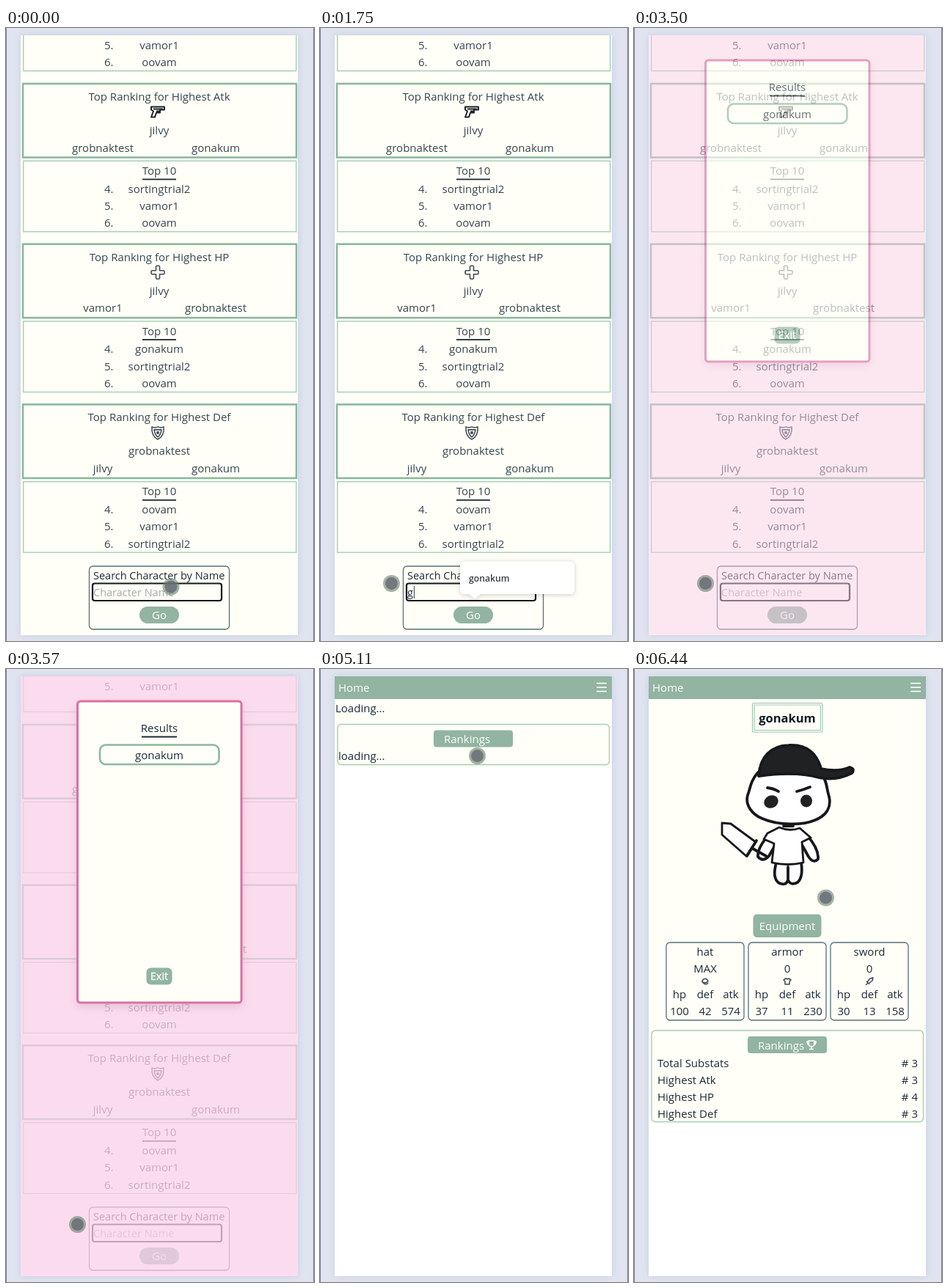
An HTML page that plays this animation: 420 by 836 pixels, repeating every 6510 ms.

```html
<!DOCTYPE html>
<html lang="en">
<head>
<meta charset="utf-8">
<title>Character rankings</title>
<style>
  html, body { margin: 0; width: 100%; height: 100%; overflow: hidden; background: #e1e4f0; }
  svg { display: block; width: 420px; height: 836px; font: 15px "Open Sans", sans-serif; fill: #36454f; }
  .mid { text-anchor: middle; }
  .end { text-anchor: end; }
  .white { fill: #fcfffa; }
  .dark { fill: #1c2a36; }
  .hint { fill: #a6aaab; }
  .form { font-size: 14.5px; }
  .fill { fill: #92b4a1; }
  .cream { fill: #fffff7; }
  .edge { fill: #7d8093; }
  .bold { stroke: #fff; stroke-width: .3; font-size: 14.5px; }
  .name { font-weight: bold; font-size: 16.5px; fill: #111820; }
  .option { font-weight: 600; font-size: 12.2px; fill: #35403f; }
  .thick, .thin, .plate, .slate, .focus, .icon, .ink { fill: none; }
  .thick { stroke: #8bb89f; stroke-width: 2.6; }
  .thin { stroke: #a6ccb6; stroke-width: 1.4; }
  .plate { stroke: #9cc7b0; stroke-width: 1.1; }
  .slate { stroke: #55717a; stroke-width: 1.3; }
  .focus { stroke: #12191c; stroke-width: 2.2; }
  .icon { stroke: #414c54; stroke-width: 1.6; stroke-linejoin: round; }
  .icon.heavy { stroke: #1d2428; stroke-width: 2; }
  .icon.light { stroke: #fcfffa; }
  .ink { stroke: #16181a; stroke-width: 3.8; stroke-linecap: round; stroke-linejoin: round; }
  .ink.fine { stroke-width: 2.8; }
  .ink.skin { fill: #fff; }
  .ink.solid { fill: #202123; }
  .popup { fill: #fff; filter: drop-shadow(0 1px 3px #0003); }
  .modal { fill: #fffff7; stroke: #d971a5; stroke-width: 3; filter: drop-shadow(0 5px 6px #a0608033); }
  .page { fill: #fff; filter: drop-shadow(0 0 5px #c3cee0); }
</style>
</head>
<body>
<svg id="stage" viewBox="0 0 420 836"></svg>
<script>
const LOOP = 6510, STEP = 70;
const HERO = 'gonakum', ACE = 'jilvy', BRUTE = 'grobnaktest', FIRST = 'vamor1', SECOND = 'oovam', BOARD = 'sortingtrial2';

const text = (x, y, s, cls = '') => `<text x="${x}" y="${y}" class="${cls}">${s}</text>`;
const box = (x, y, x2, y2, cls, r = 0) =>
  `<rect x="${x}" y="${y}" width="${x2 - x}" height="${y2 - y}" rx="${r}" class="${cls}"/>`;
const path = (d, cls, at = '0 0') => `<path d="${d}" class="${cls}" transform="translate(${at})"/>`;
const group = (id, body) => `<g id="${id}">${body}</g>`;

const rows = (y, names) => names.map((n, i) =>
  text(134, y + i * 23.3, `${i + 7 - names.length}.`) + text(209, y + i * 23.3, n, 'mid')).join('');

const icons = {
  Atk: ['M-9-7H9V-3H3V1H-2L-4 7H-9L-6-1-9-3ZM-6-4H7M-2-1H2', 'icon heavy'],
  HP: ['M-1.5-9H1.5L2.5-8V-2.5H8L9-1.5V1.5L8 2.5H2.5V8L1.5 9H-1.5L-2.5 8V2.5H-8L-9 1.5V-1.5L-8-2.5H-2.5V-8Z', 'icon'],
  Def: ['M-8-8Q-4-6 0-8Q4-6 8-8Q9 5 0 9Q-9 5-8-8ZM-5-4H5Q4 3 0 6Q-4 3-5-4ZM-1-1H1V1H-1Z', 'icon']
};

function ranking(y, stat, [one, two, three, ...rest]) {
  return box(23, y, 396, y + 100.5, 'thick') +
    text(209, y + 23, 'Top Ranking for Highest ' + stat, 'mid') +
    path(...icons[stat], `207 ${y + 38.5}`) +
    text(209, y + 69, one, 'mid') + text(132, y + 92.5, two, 'mid') + text(286, y + 92.5, three, 'mid') +
    box(23.7, y + 105.3, 395.7, y + 201.8, 'thin') +
    text(209, y + 124, 'Top 10', 'mid') + box(186, y + 129.5, 232, y + 131.3, 'dark') +
    rows(y + 148.5, rest);
}

const rankings = group('rankings',
  box(20, 10, 398, 828, 'cream') +
  path('M23.7 10V58.5H395.7V10', 'thin') + rows(29, [FIRST, SECOND]) +
  ranking(76, 'Atk', [ACE, BRUTE, HERO, BOARD, FIRST, SECOND]) +
  ranking(294.7, 'HP', [ACE, FIRST, BRUTE, HERO, BOARD, SECOND]) +
  ranking(513.4, 'Def', [BRUTE, ACE, HERO, SECOND, FIRST, BOARD]) +
  box(113.5, 734, 304.5, 820, 'slate', 5) +
  text(119, 752, 'Search Character by Name', 'form dark') +
  box(118, 757.5, 294, 781, 'focus', 3) +
  '<text id="field" x="119" y="775"></text>' +
  '<rect id="caret" y="761" width="1" height="17"/>' +
  box(182, 789, 236, 812, 'fill', 11.5) + text(209, 806, 'Go', 'mid white'));

const popup = (id, y, names) => group(id,
  path(`M197 ${y}H341Q347 ${y} 347 ${y + 6}V766Q347 772 341 772H219L211 779 203 772H197Q191 772 191 766V${y + 6}Q191 ${y} 197 ${y}Z`, 'popup') +
  names.map((n, i) => text(203, y + 27 + i * 36, n, 'option')).join(''));

const modal = group('modal',
  '<rect x="20" y="10" width="378" height="818" fill="#fad0eb" opacity=".75"/>' +
  box(97.5, 44, 321, 455, 'modal', 4) +
  text(209, 86, 'Results', 'mid dark') + box(185, 91.5, 233, 93.5, 'dark') +
  box(128, 103.5, 290.5, 130, 'thick', 8) + text(209, 123, HERO, 'mid dark') +
  box(191.5, 407.5, 226.5, 430.5, 'fill', 6) + text(209, 424, 'Exit', 'mid white bold'));

const header = group('header',
  box(20, 10, 398, 41, 'fill') + text(25, 31, 'Home', 'white') +
  [19.5, 25, 30.5].map(y => box(377, y - .8, 391, y + .8, 'white')).join(''));

const rankPanel = (y, y2) => box(20, 41, 398, y2 + 4, 'cream') + box(24, y, 394.5, y2, 'thin', 5) +
  box(155, y + 8, 263, y + 31, 'fill', 4) + text(169, y + 25.5, 'Rankings', 'white');

const loading = group('loading',
  rankPanel(75.5, 130.5) + text(21, 59, 'Loading...', 'dark') + text(25, 124, 'loading...', 'dark'));

const avatar =
  path('M194 264Q188 286 198 292Q207 296 210 288Q214 296 223 291Q231 284 228 264ZM210 270V288', 'ink skin') +
  path('M186 224Q168 243 169 256Q176 264 184 255L195 236M236 227Q252 245 251 259Q245 266 238 256L228 238', 'ink skin') +
  path('M198 216 182 224 177 232 191 238 188 264Q210 269 231 264L229 236 241 230 226 217Q212 222 198 216Z', 'ink skin fine') +
  path('M169 141C158 154 159 162 155 172C151 186 162 199 175 204C198 214 231 213 247 206C264 199 269 187 266 174C262 162 264 154 256 144Z', 'ink skin') +
  path('M170 146C172 120 186 105 211 104C237 102 250 117 255 136Q279 141 294 134Q302 136 297 142Q275 153 252 148Q220 139 170 146Z', 'ink solid') +
  path('M182 162Q191 163 197 167M222 167Q230 165 240 161', 'ink') +
  '<g fill="#202123"><ellipse cx="187" cy="181" rx="10" ry="8.5" transform="rotate(-25 187 181)"/><ellipse cx="235" cy="180" rx="8" ry="8.5"/></g>' +
  path('M120 210 132 211 166 236 153 255 120 226Z', 'ink skin fine') +
  path('M167 234 154 255M162 245 180 255M204 214H217', 'ink');

function card(x, title, level, icon, stats) {
  const line = (y, cells) => cells.map((c, i) => text(x + (i - 1) * 35, y, c, 'mid dark')).join('');
  return box(x - 53, 373, x + 53, 479, 'slate', 5) +
    text(x, 391, title, 'mid dark') + text(x, 413.5, level, 'mid dark') + path(icon, 'icon', `${x} 426`) +
    line(449, ['hp', 'def', 'atk']) + line(472, stats);
}

const profile = group('profile',
  rankPanel(493, 617.5) +
  box(161.5, 46.5, 257, 86, 'plate', 2) + box(164, 49, 254.5, 83.5, 'plate', 1) +
  text(209, 72.5, HERO, 'mid name') + avatar +
  box(162.5, 334.5, 255.5, 366, 'fill', 5) + text(209, 355.5, 'Equipment', 'mid white') +
  card(97, 'hat', 'MAX', 'M-4 1A4 4 0 1 1 4 0L1 2-4 1ZM-3 2Q2 6 4 2', [100, 42, 574]) +
  card(209, 'armor', 0, 'M-2-4 0-3 2-4 5-2 3 0V4H-3V0L-5-2Z', [37, 11, 230]) +
  card(321, 'sword', 0, 'M5-5 4-1-1 3-3 1 1-4ZM-4 0 0 4M-2 2-5 5', [30, 13, 158]) +
  path('M-4-6H4V-2Q3 2 0 2Q-3 2-4-2ZM-4-5H-6Q-6-1-3 0M4-5H6Q6-1 3 0M0 2V5M-3 5.5H3', 'icon light', '242 513') +
  [['Total Substats', 3], ['Highest Atk', 3], ['Highest HP', 4], ['Highest Def', 3]].map(([label, rank], i) =>
    text(32, 542.5 + i * 23, label, 'dark') + text(387, 542.5 + i * 23, '# ' + rank, 'end dark')).join(''));

const stage = document.getElementById('stage');
stage.innerHTML =
  box(0, 0, 1, 836, 'edge') + box(419, 0, 420, 836, 'edge') +
  box(20, 10, 398, 828, 'page') + rankings + loading + profile + header + modal +
  '<g id="cursor"><circle r="11.5" fill="#648070" opacity=".6"/><circle r="8.5" fill="#666973" opacity=".8"/></g>' +
  popup('history', 548, [SECOND, BRUTE, 12, 'grooooo Lad', 'hjkl', SECOND + '223']) +
  popup('match', 727.5, [HERO]);

const el = id => document.getElementById(id);
const show = (id, on) => el(id).style.display = on ? '' : 'none';

// Cursor stops: time, x, y
const stops = [[0, 225, 762], [420, 225, 762], [840, 153, 747], [980, 143.5, 748.5], [1400, 97.5, 757.5],
  [3710, 97.5, 757.5], [4410, 214.5, 121.5], [4830, 214.5, 121.5], [4900, 214.5, 118.5], [5600, 214.5, 118.5],
  [6020, 261.5, 312], [LOOP, 261.5, 312]];
const keys = [1680, 2100, 2310, 2520, 2730, 2940, 3150];
const CLICK = 420, ENTER = 3430, OPEN = 4830, LOADED = 5250;

function cursorAt(t) {
  const i = stops.findIndex(s => s[0] > t);
  const [t0, x0, y0] = stops[i - 1], [t1, x1, y1] = stops[i];
  const p = (t - t0) / (t1 - t0), e = p * p * (3 - 2 * p);
  return [x0 + (x1 - x0) * e, y0 + (y1 - y0) * e];
}

function draw(now) {
  const t = Math.floor(now % LOOP / STEP) * STEP;
  const typed = t < ENTER ? HERO.slice(0, keys.filter(k => k <= t).length) : '';
  show('rankings', t < OPEN);
  show('modal', t >= ENTER && t < OPEN);
  show('header', t >= OPEN);
  show('loading', t >= OPEN && t < LOADED);
  show('profile', t >= LOADED);
  show('history', t >= CLICK && t < keys[0]);
  show('match', typed);
  show('caret', typed);
  el('modal').setAttribute('opacity', Math.min(1, (t - ENTER + STEP) / 210));
  const field = el('field');
  field.textContent = typed || 'Character Name';
  field.setAttribute('class', typed ? 'form dark' : 'form hint');
  if (typed) el('caret').setAttribute('x', 120 + field.getComputedTextLength());
  el('cursor').setAttribute('transform', `translate(${cursorAt(t)})`);
  requestAnimationFrame(() => draw(performance.now()));
}
draw(0);
</script>
</body>
</html>
```
